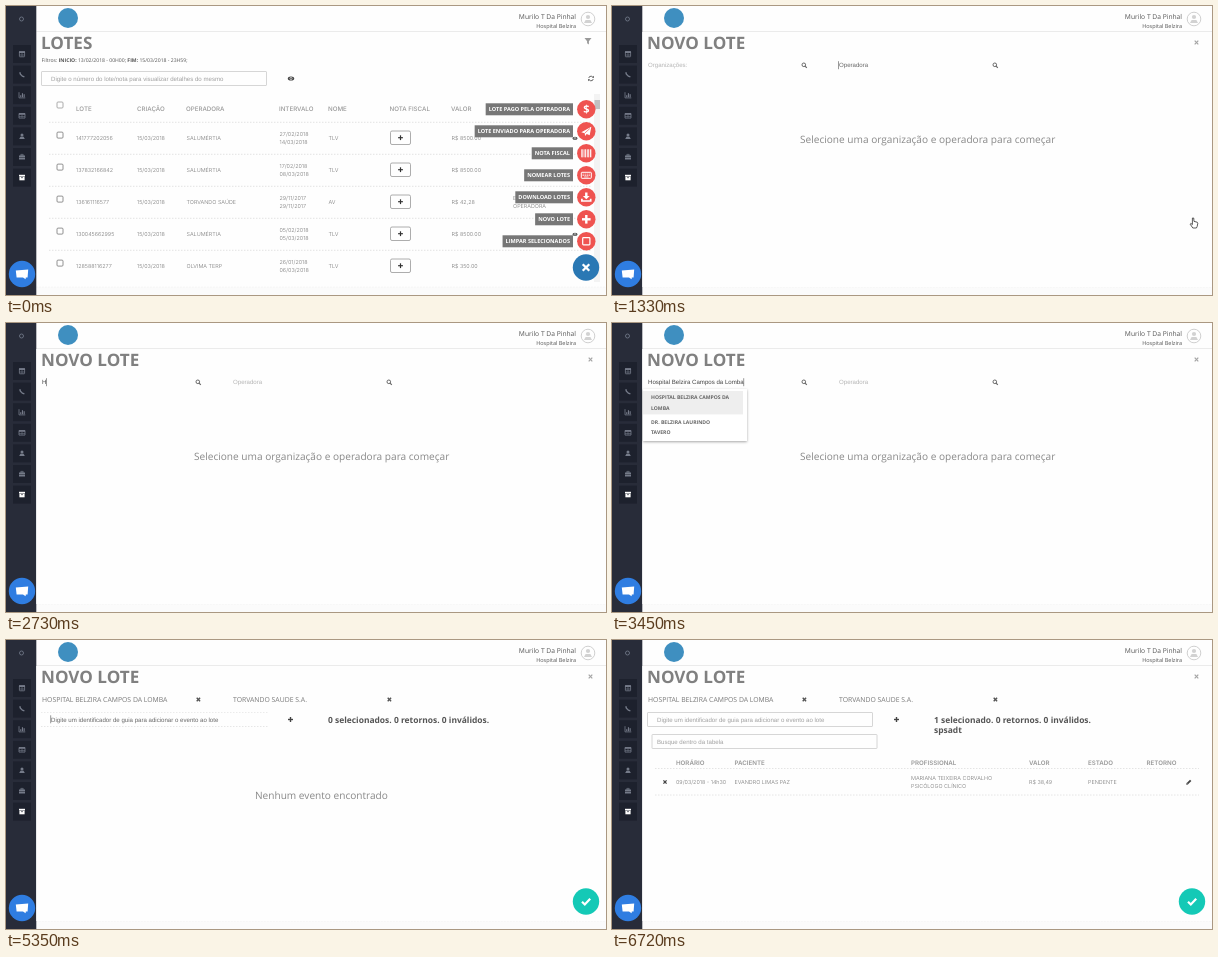
These frames come from a looping animation (600x289 px, 8 s). An HTML page with a canvas:

```html
<!DOCTYPE html>
<html lang="pt-BR">
<head>
<meta charset="utf-8">
<title>Novo lote</title>
<style>
html, body { margin: 0; width: 100%; height: 100%; overflow: hidden; background: #fff; }
canvas { display: block; width: 100vw; height: 100vh; }
</style>
</head>
<body>
<canvas id="stage"></canvas>
<script>
const W = 600, H = 289, LOOP = 8000, SIDE = 30.3;
const canvas = document.getElementById('stage');
const ratio = window.devicePixelRatio || 1;
canvas.width = W * ratio;
canvas.height = H * ratio;
const g = canvas.getContext('2d');

const OPEN = '"Open Sans", "Noto Sans", sans-serif';
const ARIAL = '"Liberation Sans", Arial, sans-serif';
const INTER = 'Inter, sans-serif';
const HOSPITAL = 'Hospital Belzira Campos da Lomba';
const INSURER = 'TORVANDO SAUDE S.A.';

// ---------- helpers ----------
function rect(x, y, w, h, color) {
  g.fillStyle = color;
  g.fillRect(x, y, w, h);
}
function frame(x, y, w, h, color, r = 0, lw = 1) {
  g.strokeStyle = color;
  g.lineWidth = lw;
  g.beginPath();
  g.roundRect(x, y, w, h, r);
  g.stroke();
}
function disc(x, y, r, color) {
  g.fillStyle = color;
  g.beginPath();
  g.arc(x, y, r, 0, 7);
  g.fill();
}
function ring(x, y, r, color, lw) {
  g.strokeStyle = color;
  g.lineWidth = lw;
  g.beginPath();
  g.arc(x, y, r, 0, 7);
  g.stroke();
}
// pts is a flat list of x, y pairs
function trace(x, y, pts) {
  g.beginPath();
  for (let i = 0; i < pts.length; i += 2) g.lineTo(x + pts[i], y + pts[i + 1]);
}
function line(x, y, pts, color, lw = 1) {
  trace(x, y, pts);
  g.strokeStyle = color;
  g.lineWidth = lw;
  g.stroke();
}
function shape(x, y, pts, color) {
  trace(x, y, pts);
  g.closePath();
  g.fillStyle = color;
  g.fill();
}
function rule(x1, x2, y, color) {
  g.setLineDash([1.5, 1.5]);
  line(0, y, [x1, 0, x2, 0], color, 0.8);
  g.setLineDash([]);
}
// y is the middle of the capitals; returns the width
function text(s, x, y, size, color, font = OPEN, weight = 400, align = 'left') {
  g.font = `${weight} ${size}px ${font}`;
  g.textAlign = align;
  g.fillStyle = color;
  g.fillText(s, x, y + size * 0.36);
  return g.measureText(s).width;
}
const title = s => text(s, 35, 37, 17.1, '#808080', OPEN, 700);
const head = (s, x, y, weight = 500) => text(s, x, y, 6.2, '#999', INTER, weight);
const cell = (s, x, y) => text(s, x, y, 5.45, '#777', INTER, 300);
const caret = (x, y) => rect(x, y - 4, 0.6, 8, '#555');

// ---------- icons ----------
const cross = (x, y, r, color, lw) => {
  line(x, y, [-r, -r, r, r], color, lw);
  line(x, y, [r, -r, -r, r], color, lw);
};
const plus = (x, y, r, color, lw) => {
  line(x, y, [-r, 0, r, 0], color, lw);
  line(x, y, [0, -r, 0, r], color, lw);
};
function eye(x, y, s = 1) {
  g.fillStyle = '#444';
  g.beginPath();
  g.ellipse(x, y, 3.2 * s, 2 * s, 0, 0, 7);
  g.fill();
  ring(x, y, 1.1 * s, '#fff', 0.6 * s);
}
function lens(x, y) {
  ring(x - 0.6, y - 0.7, 1.8, '#666', 1);
  line(x, y, [0.7, 0.6, 2.4, 2.3], '#666', 1.2);
}
function refresh(x, y) {
  g.strokeStyle = '#555';
  g.lineWidth = 0.9;
  for (const a of [0.2, 3.34]) {
    g.beginPath();
    g.arc(x, y, 2.3, a, a + 2.4);
    g.stroke();
  }
  shape(x, y, [0.9, -0.7, 3, -0.7, 3, -2.8], '#555');
  shape(x, y, [-0.9, 0.7, -3, 0.7, -3, 2.8], '#555');
}
function hand(x, y) {
  const pts = [-1.6, -5, -0.3, -5, 0, -1.6, 3.2, -0.8, 3.8, 0.2, 3.2, 3.4, 2.4, 5,
    -1.2, 5, -3.8, 1.2, -3.2, 0.4, -1.6, 1.6, -1.6, -5];
  shape(x, y, pts, '#fff');
  line(x, y, pts, '#333', 0.8);
}
function arrow(x, y) {
  const pts = [0, 0, 0, 9, 2.1, 7.1, 3.6, 10.2, 4.9, 9.6, 3.5, 6.6, 6.2, 6.4, 0, 0];
  shape(x, y, pts, '#fff');
  line(x, y, pts, '#333', 0.7);
}

const sideIcons = [
  (x, y, c) => { frame(x - 2.6, y - 2.2, 5.2, 5, c, 0.4, 0.8); rect(x - 3, y - 2.8, 6, 1.8, c); line(x, y, [-2.6, 1, 2.6, 1], c, 0.6); line(x, y, [0, -1, 0, 2.6], c, 0.6); },
  (x, y, c) => line(x, y, [-2.2, -2.4, -1.6, -0.4, 0.4, 1.6, 2.4, 2.2], c, 1.4),
  (x, y, c) => { line(x, y, [-3, -3, -3, 2.7, 3.3, 2.7], c, 0.8); [2, 4, 3].forEach((h, i) => rect(x - 1.8 + i * 1.7, y + 2 - h, 1.1, h, c)); },
  (x, y, c) => { frame(x - 3, y - 2.3, 6, 4.6, c, 0, 0.8); rect(x - 3, y - 2.6, 6, 1.6, c); line(x, y, [-3, 0.8, 3, 0.8], c, 0.6); line(x, y, [0, -1, 0, 2], c, 0.6); },
  (x, y, c) => { disc(x, y - 1.4, 1.5, c); shape(x, y, [-2.8, 2.7, -1.6, 0.4, 1.6, 0.4, 2.8, 2.7], c); },
  (x, y, c) => { rect(x - 3, y - 1.5, 6, 4, c); frame(x - 1.2, y - 2.6, 2.4, 1.4, c, 0, 0.7); line(x, y, [-3, 0.5, 3, 0.5], '#1d212d', 0.5); },
  (x, y, c) => { rect(x - 3, y - 2.8, 6, 1.6, c); rect(x - 2.6, y - 0.9, 5.2, 3.6, c); rect(x - 0.9, y - 0.2, 1.8, 0.7, '#1d212d'); }
];

const actions = [
  ['LOTE PAGO PELA OPERADORA', (x, y) => text('$', x, y, 11, '#fff', OPEN, 700, 'center')],
  ['LOTE ENVIADO PARA OPERADORA', (x, y) => {
    shape(x, y, [-5, 1, 5, -4.5, 3.4, 4, 0.4, 2.6, -1.2, 4.6, -1.6, 1.9], '#fff');
    line(x, y, [-1.6, 1.9, 3.6, -2.8], '#ef5350', 0.7);
  }],
  ['NOTA FISCAL', (x, y) => [0, 1.4, 3.2, 4.2, 6, 7.2, 8.8].forEach((d, i) => rect(x - 5 + d, y - 4, i % 2 ? 0.7 : 1.2, 8, '#fff'))],
  ['NOMEAR LOTES', (x, y) => {
    frame(x - 5, y - 3, 10, 6, '#fff', 0.6, 1);
    for (let i = 0; i < 8; i++) rect(x - 3.7 + (i % 4) * 2, y - 1.6 + (i >> 2) * 1.5, 1.2, 0.8, '#fff');
    rect(x - 2.2, y + 1.3, 4.4, 0.7, '#fff');
  }],
  ['DOWNLOAD LOTES', (x, y) => {
    rect(x - 1.2, y - 4.8, 2.4, 4, '#fff');
    shape(x, y, [-3.4, -1.2, 3.4, -1.2, 0, 2], '#fff');
    line(x, y, [-4.4, 1.4, -4.4, 3.7, 4.4, 3.7, 4.4, 1.4], '#fff', 1.7);
  }],
  ['NOVO LOTE', (x, y) => plus(x, y, 4.3, '#fff', 2.4)],
  ['LIMPAR SELECIONADOS', (x, y) => frame(x - 3.6, y - 3.6, 7.2, 7.2, '#fff', 0.8, 1.2)]
];

const batches = [
  ['141777202056', 'SALUMÉRTIA', '27/02/2018', '14/03/2018', 'TLV', 'R$ 8500.00'],
  ['137832166842', 'SALUMÉRTIA', '17/02/2018', '08/03/2018', 'TLV', 'R$ 8500.00'],
  ['136161116577', 'TORVANDO SAÚDE', '29/11/2017', '29/11/2017', 'AV', 'R$ 42,28'],
  ['130045662995', 'SALUMÉRTIA', '05/02/2018', '05/03/2018', 'TLV', 'R$ 8500.00'],
  ['128588116277', 'OLVIMA TERP', '26/01/2018', '06/03/2018', 'TLV', 'R$ 350.00']
];

// ---------- parts ----------
function shell() {
  rect(0, 0, W, H, '#fefefe');
  rect(SIDE, 281, W - SIDE, 8, '#fbfbfb');
  rule(SIDE, W, 281, '#f0f0f0');
  rect(SIDE, 25, W - SIDE, 0.8, '#e6e6e6');
  rect(0, 0, SIDE, H, '#282c39');
  ring(15.5, 13, 2, '#6f7686', 0.9);
  sideIcons.forEach((icon, i) => {
    const y = 48 + i * 20.6;
    rect(7, y - 9, 18, 18, '#1d212d');
    icon(16, y, i === 6 ? '#fff' : '#757b89');
  });
  disc(62, 12, 10, '#3f8fc0');
  text('Murilo T Da Pinhal', 570, 11, 6.7, '#555', OPEN, 400, 'right');
  text('Hospital Belzira', 570, 19.7, 5.5, '#555', OPEN, 400, 'right');
  ring(582, 13, 6.8, '#c4c4c4', 0.8);
  disc(582, 11, 2.1, '#d2d2d2');
  shape(582, 13, [-4, 4, -2.4, 1, 2.4, 1, 4, 4], '#d2d2d2');
}

function chat() {
  disc(16, 268, 13.2, '#2f7de1');
  shape(16, 268, [-6.2, -3.6, 6.2, -4.6, 5.6, 3.4, 3.8, 3.5, 3.6, 5.2, 1, 3.6, -5.4, 3.4], '#fff');
}

function filters() {
  let x = 35.5;
  const parts = ['Filtros: ', 'INICIO:', ' 13/02/2018 - 00H00; ', 'FIM:', ' 15/03/2018 - 23H59;'];
  parts.forEach((s, i) => { x += text(s, x, 54.5, 5.1, '#555', OPEN, i % 2 ? 700 : 400); });
}

function listPage() {
  title('LOTES');
  filters();
  shape(582, 35, [-3.5, -3, 3.5, -3, 0.9, 0.2, 0.9, 3.4, -0.9, 2.2, -0.9, 0.2], '#999');
  frame(35.5, 65.5, 225, 14, '#ccc', 0.5, 0.8);
  text('Digite o número do lote/nota para visualizar detalhes do mesmo', 45, 72.6, 6.1, '#a0a0a0', ARIAL);
  eye(285, 72.5);
  refresh(585, 72.5);

  [['LOTE', 70], ['CRIAÇÃO', 131], ['OPERADORA', 180], ['INTERVALO', 273], ['NOME', 322],
    ['NOTA FISCAL', 383.5], ['VALOR', 445]].forEach(([s, x]) => head(s, x, 102.5));
  frame(51, 96, 6, 6, '#999', 1, 0.8);
  batches.forEach(([id, insurer, from, to, name, value], i) => {
    const y = 132.3 + i * 32;
    rule(43, 586, y - 16, '#ddd');
    frame(51, y - 6.2, 6, 6, '#777', 1, 0.8);
    cell(id, 70, y);
    cell('15/03/2018', 131, y);
    cell(insurer, 180.5, y);
    cell(from, 273.5, y - 4);
    cell(to, 273.5, y + 4);
    cell(name, 322.5, y);
    frame(384.5, y - 7.3, 20, 13.5, '#999', 1.5, 0.8);
    plus(394.5, y - 0.6, 2.4, '#333', 1.2);
    cell(value, 445.5, y);
  });
  cell('ENVIADO À', 507, 192);
  cell('OPERADORA', 507, 200.3);
  eye(569, 132.3, 0.8);
  eye(569, 228.3, 0.8);
  rect(588, 88, 6, 188, '#f3f3f3');
  rect(588.5, 94, 5.5, 9, '#c1c1c1');

  actions.forEach(([label, icon], i) => {
    const y = 103.3 + i * 22;
    g.font = `700 5.55px ${OPEN}`;
    const w = g.measureText(label).width + 6;
    rect(567 - w, y - 6, w, 12, '#777');
    text(label, 570 - w, y, 5.55, '#fff', OPEN, 700);
    disc(580.3, y, 9.2, '#ef5350');
    icon(580.3, y);
  });
  disc(580, 261.5, 13.2, '#2a78b4');
  cross(580, 261.5, 3.3, '#fff', 2.3);
}

function menu(x, w, items, active) {
  const h = items.flat().length * 10.6 + items.length * 2.8 + 4;
  g.save();
  g.shadowColor = 'rgba(0,0,0,.35)';
  g.shadowBlur = 2.5 * ratio;
  g.shadowOffsetY = ratio;
  rect(x, 66, w, h, '#fff');
  g.restore();
  let y = 68;
  items.forEach((rows, i) => {
    const ih = rows.length * 10.6 + 2.2;
    if (active && !i) rect(x, y, w - 4, ih, '#eee');
    rows.forEach((s, k) => text(s, x + 8, y + 6.6 + k * 10.6, 5.1, '#666', OPEN, 700));
    y += ih + 0.9;
  });
}

// one search field of the form
function field(x, hint, value, focused, chosen) {
  const icon = x + 156.4;
  if (chosen) {
    text(chosen, x, 59.5, 6.85, '#777');
    cross(icon, 59.5, 1.7, '#555', 1.4);
    return;
  }
  const w = value ? text(value, x, 59, 6.1, '#444', ARIAL)
    : text(hint, x, 59, 6.1, focused ? '#666' : '#b4b4b4', ARIAL);
  if (focused) caret(value ? x + w : x - 0.7, 59.2);
  lens(icon, 59.5);
}

// number of characters typed by time t
const typed = (s, t, times) => s.slice(0, times.filter(k => t >= k).length);

function formPage(t) {
  title('NOVO LOTE');
  cross(584.5, 36.5, 1.8, '#a4a4a4', 1.2);

  const org = t >= 3450 ? HOSPITAL : typed(HOSPITAL, t, [2670, 2760, 2860]);
  const payer = typed('Torv', t, [4310, 4390, 4470, 4560]);
  field(36, 'Organizações:', org, t >= 2470, t >= 3780 && HOSPITAL.toUpperCase());
  field(227, 'Operadora', payer, t < 2470 || t >= 4110, t >= 5150 && INSURER);

  if (t < 5350) text('Selecione uma organização e operadora para começar', 188, 133.3, 10.1, '#888');
  else eventPanel(t);

  if (t >= 3190 && t < 3780) {
    menu(31, 104, [['HOSPITAL BELZIRA CAMPOS DA', 'LOMBA'], ['DR. BELZIRA LAURINDO', 'TAVERO']], t >= 3450);
  }
  if (t >= 4890 && t < 5150) menu(222, 104, [[INSURER]], t >= 4950);
}

function eventPanel(t) {
  const added = t >= 6260;
  if (added) frame(35.5, 72.5, 225, 14, '#ccc', 0.5, 0.8);
  else {
    rule(35, 262, 72.5, '#e6e6e6');
    rule(35, 262, 86.5, '#e0e0e0');
  }
  if (t >= 5930 && !added) caret(45.5 + text('201803091430', 45, 79.5, 6.1, '#444', ARIAL), 79.5);
  else {
    text('Digite um identificador de guia para adicionar o evento ao lote', 45, 79.5, 6.1, added ? '#a0a0a0' : '#666', ARIAL);
    if (!added) caret(44.5, 79.3);
  }
  plus(284.5, 79.5, 2.5, '#444', 1.4);
  text(`${added ? '1 selecionado' : '0 selecionados'}. 0 retornos. 0 inválidos.`, 322, 79.5, 8.45, '#555', OPEN, 700);
  disc(580, 261.5, 13.2, '#14c9b6');
  line(580, 261.5, [-4, 0.2, -1.2, 3, 4.2, -2.8], '#fff', 2.2);

  if (!added) {
    text('Nenhum evento encontrado', 249, 155.5, 10.1, '#888');
    return;
  }
  text('spsadt', 322, 89.7, 8.45, '#555', OPEN, 700);
  frame(40, 94.5, 225, 14, '#ccc', 0.5, 0.8);
  text('Busque dentro da tabela', 45, 101.6, 6.1, '#a0a0a0', ARIAL);
  [['HORÁRIO', 64], ['PACIENTE', 122.5], ['PROFISSIONAL', 299], ['VALOR', 417], ['ESTADO', 476],
    ['RETORNO', 534.5]].forEach(([s, x]) => head(s, x, 122.3, 600));
  rule(43, 587, 128.5, '#ddd');
  if (t < 6460) return;
  cross(53, 142, 1.6, '#444', 1.3);
  cell('09/03/2018 - 14h30', 64, 142);
  cell('EVANDRO LIMAS PAZ', 122.5, 142);
  cell('MARIANA TEIXEIRA CORVALHO', 299, 138);
  cell('PSICÓLOGO CLÍNICO', 299, 146);
  cell('R$ 38,49', 417, 142);
  cell('PENDENTE', 476, 142);
  line(577, 142, [-1.6, 1.6, 1.7, -1.7], '#444', 1.9);
  shape(577, 142, [-2.8, 2.8, -2.4, 0.8, -0.8, 2.4], '#444');
  rule(43, 587, 155, '#ddd');
}

const ease = p => p * p * (3 - 2 * p);

function pointer(t) {
  if (t >= 60 && t < 1660) {
    const p = ease(Math.min(1, (t - 60) / 420));
    hand(580 + 2 * p, 262 - 45 * p);
  } else if (t >= 1660 && t < 2080) {
    const p = ease((t - 1660) / 430);
    arrow(582 - 500 * p, 213 - 153 * p);
  }
}

function draw(t) {
  g.setTransform(ratio, 0, 0, ratio, 0, 0);
  g.globalAlpha = 1;
  g.textRendering = 'geometricPrecision';
  shell();
  if (t < 1330) listPage();
  if (t >= 1080) {
    // the form fades in over the list in four steps
    g.globalAlpha = Math.min(1, Math.floor((t - 996) / 83.4) / 4);
    rect(SIDE, 26, W - SIDE, 255, '#fefefe');
    formPage(t);
    g.globalAlpha = 1;
  }
  chat();
  pointer(t);
}

const start = performance.now();
function tick() {
  draw((performance.now() - start) % LOOP);
  requestAnimationFrame(tick);
}
tick();
</script>
</body>
</html>
```
